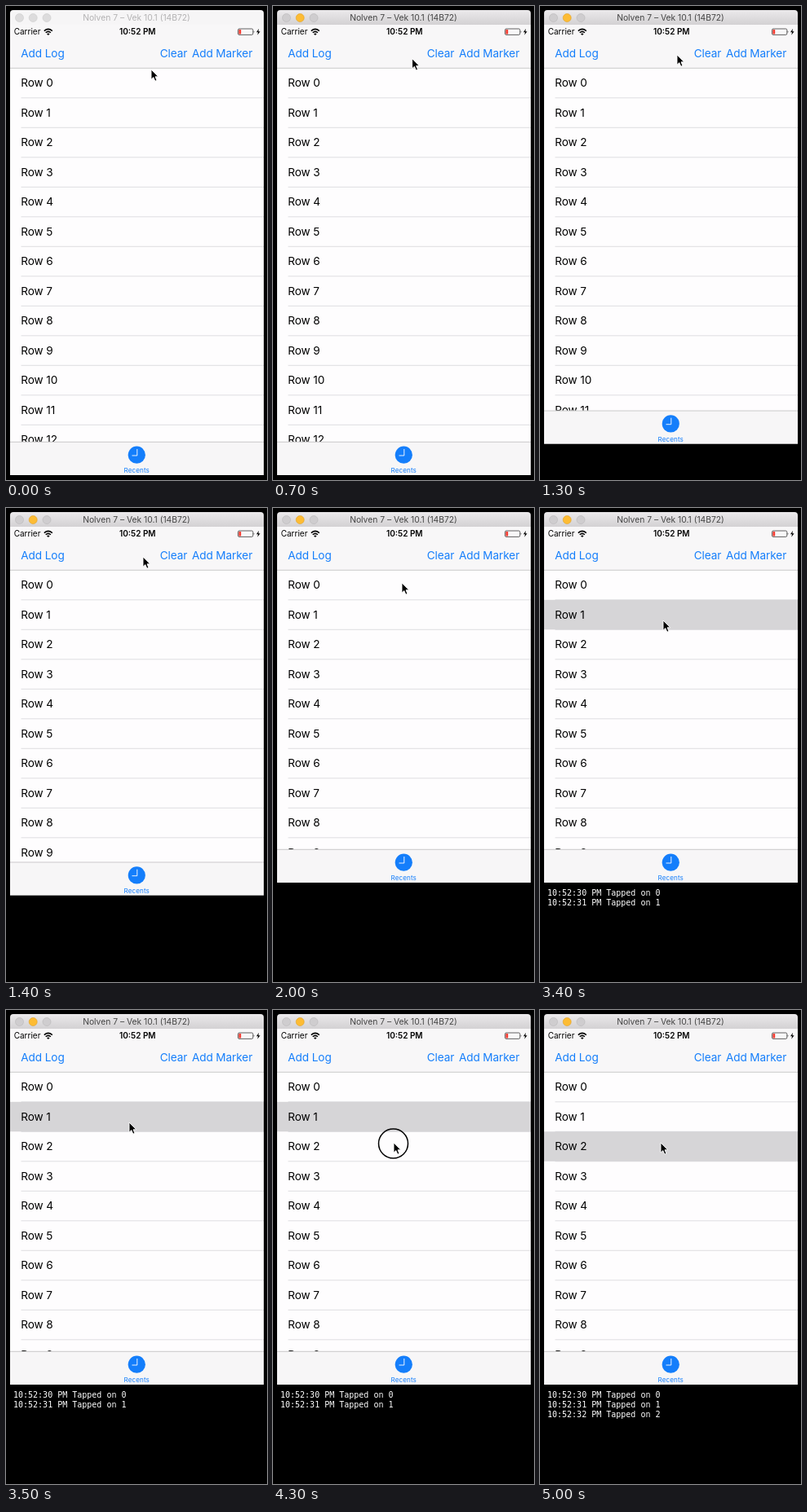
Write an HTML page that moves like this. It is 320 px wide and 582 px high and loops after 5100 ms.

```html
<!DOCTYPE html>
<html lang="en">
<head>
<meta charset="utf-8">
<title>Tap log</title>
<style>
  html, body { margin: 0; height: 100%; overflow: hidden; background: #000; }
  svg { display: block; width: 320px; height: 582px; font: 13.6px Inter, sans-serif; }
  .blue { fill: #147efb; letter-spacing: -.1px; }
  .small { font-size: 10px; }
  .mono { font: 10px "DejaVu Sans Mono", monospace; fill: #fff; white-space: pre; }
</style>
</head>
<body>
<svg viewBox="0 0 320 582">
  <defs>
    <linearGradient id="chrome" x2="0" y2="1">
      <stop stop-color="#ebe9eb"/><stop offset="1" stop-color="#d3d1d3"/>
    </linearGradient>
    <clipPath id="window"><path d="M5 582V9q0-4 4-4H312q4 0 4 4V582z"/></clipPath>
  </defs>
  <rect width="320" height="582"/>
  <g clip-path="url(#window)">
    <rect x="5" y="76" width="311" height="506" fill="#fefdfe"/>
    <rect id="highlight" x="5" width="311" height="36.5" fill="#d6d5d7"/>
    <g id="rows"></g>

    <rect x="5" y="23" width="311" height="53" fill="#f8f7f8"/>
    <path d="M5 76.3H316" stroke="#b4b3b5" stroke-width=".7"/>
    <rect id="titlebar" x="5" y="5" width="311" height="18"/>
    <g stroke-width=".6">
      <circle class="light" cx="16.5" cy="14.5" r="5"/>
      <circle class="light" id="yellow" cx="33.2" cy="14.5" r="5"/>
      <circle class="light" cx="50" cy="14.5" r="5"/>
    </g>
    <text id="title" x="160" y="18.2" font-size="10.3" text-anchor="middle">Nolven 7 – Vek 10.1 (14B72)</text>

    <text class="small" x="9.7" y="35.2">Carrier</text>
    <g fill="none" stroke="#000" stroke-width="1.5">
      <path d="M46.8 30.6q5-4.4 10 0M48.7 32.7q3.1-2.6 6.2 0"/>
    </g>
    <path d="M50 34.2q1.8-1.3 3.6 0L51.8 36z"/>
    <text class="small" x="161.3" y="35.2" font-weight="600" text-anchor="middle">10:52 PM</text>
    <rect x="284.5" y="28" width="18.3" height="7.4" rx="1.5" fill="none" stroke="#222" stroke-width=".7"/>
    <rect x="285.4" y="29" width="2.8" height="5.5" rx=".5" fill="#fb3b30"/>
    <path d="M303.7 30.3q1.4 1.4 0 2.8z"/>
    <path d="M310 27.8L307 32.2H309.1L308.2 35.8L311.6 31.2H309.4z"/>

    <g class="blue">
      <text x="18.3" y="63">Add Log</text>
      <text x="188.7" y="63">Clear</text>
      <text x="302.2" y="63" text-anchor="end">Add Marker</text>
    </g>

    <g id="tab">
      <rect x="5" width="311" height="41" fill="#f7f6f7"/>
      <path d="M5 .3H316" stroke="#b6b5b7" stroke-width=".7"/>
      <circle cx="160.3" cy="16.2" r="10.6" fill="#147efb"/>
      <path d="M160.8 9V17H154.5" fill="none" stroke="#fff" stroke-width=".9"/>
      <text class="blue" x="160.2" y="38.2" style="font-size:8.1px;letter-spacing:.1px" text-anchor="middle">Recents</text>
      <rect x="5" y="41" width="311" height="130"/>
    </g>
  </g>
  <g id="log" class="mono"></g>
  <circle id="ring" cx="147.5" r="18" fill="none" stroke="#000" stroke-width="1.5"/>
  <path id="cursor" d="M0 0V12.2L2.8 9.6L4.8 14.2L6.9 13.3L5 8.8H8.7z" stroke="#fff" stroke-width=".9"/>
</svg>
<script>
const LOOP = 5100, STEP = 100, ROW = 36.5, LIST_TOP = 76.3;
const ACTIVATE = 400, PANEL_START = 1200, PANEL_TIME = 260, PANEL_HEIGHT = 116;
const PRESS_TIME = 200;
const taps = [2300, 3400, 4500];
// Cursor path: time, x, y
const path = [
  [0, 178, 78], [300, 178, 78], [900, 168, 60], [1600, 168, 60],
  [2000, 158, 92], [2400, 157, 93], [2800, 154, 100], [3200, 151, 138],
  [3700, 151, 138], [4200, 148, 163], [LOOP, 148, 163]
];

const el = id => document.getElementById(id);
const show = (node, on) => node.style.display = on ? '' : 'none';
const ease = p => p * p * (3 - 2 * p);
const clamp = p => Math.min(1, Math.max(0, p));

el('rows').innerHTML = Array.from({ length: 13 }, (_, i) => {
  const y = LIST_TOP + i * ROW;
  return `<text x="18.3" y="${y + 22.9}" letter-spacing="-.1">Row ${i}</text>
    <path d="M18.5 ${y + ROW}H316" stroke="#d2d1d4" stroke-width=".7"/>`;
}).join('');

el('log').innerHTML = taps.map((_, i) =>
  `<text x="9" y="${476.3 + i * 11.6}">10:52:${30 + i} PM Tapped on ${i}</text>`).join('');
const logLines = [...el('log').children];

function cursorAt(t) {
  const i = path.findIndex(p => p[0] > t);
  const [t0, x0, y0] = path[i - 1], [t1, x1, y1] = path[i];
  const p = ease((t - t0) / (t1 - t0));
  return [x0 + (x1 - x0) * p, y0 + (y1 - y0) * p];
}

function setActive(on) {
  el('titlebar').setAttribute('fill', on ? 'url(#chrome)' : '#f6f5f6');
  el('title').setAttribute('fill', on ? '#444' : '#b3b2b3');
  for (const light of document.querySelectorAll('.light')) {
    const yellow = on && light.id === 'yellow';
    light.setAttribute('fill', yellow ? '#fdbc34' : on ? '#cfcdcf' : '#dddcdd');
    light.setAttribute('stroke', yellow ? '#dfa023' : on ? '#b9b7b9' : '#cccbcc');
  }
}

function draw(t) {
  setActive(t >= ACTIVATE);

  const open = ease(clamp((t - PANEL_START) / PANEL_TIME));
  el('tab').setAttribute('transform', `translate(0 ${535 - PANEL_HEIGHT * open})`);

  const selected = taps.filter(tap => t >= tap).length - 1;
  show(el('highlight'), selected >= 0);
  el('highlight').setAttribute('y', LIST_TOP + Math.max(0, selected) * ROW);
  logLines.forEach((line, i) => show(line, i <= selected));

  const [x, y] = cursorAt(t);
  el('cursor').setAttribute('transform', `translate(${x} ${y})`);
  el('ring').setAttribute('cx', x - .5);
  el('ring').setAttribute('cy', y + 1);
  show(el('ring'), taps.some(tap => t >= tap - PRESS_TIME && t < tap));
}

function frame() {
  draw(Math.floor(performance.now() % LOOP / STEP) * STEP);
  requestAnimationFrame(frame);
}
frame();
</script>
</body>
</html>
```
